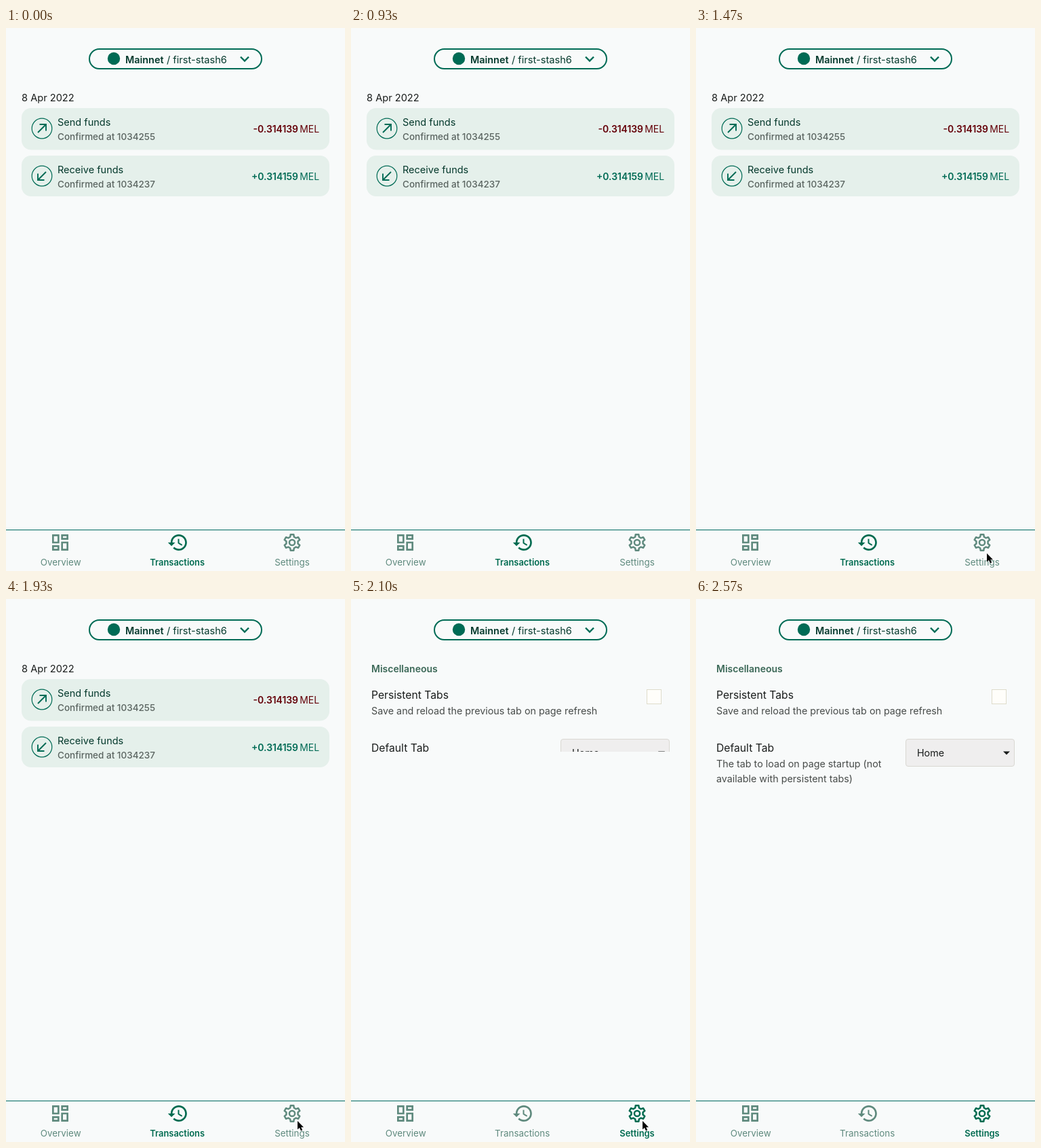
An HTML page that plays this animation: 500 px wide and 800 px high, repeating every 4.01 s.

```html
<!DOCTYPE html>
<html lang="en">
<head>
<meta charset="utf-8">
<title>Wallet tabs</title>
<style>
  html, body { margin: 0; width: 100%; height: 100%; overflow: hidden; background: #f8fafa; }
  svg { display: block; width: 500px; height: 800px; }
  text { font-family: Inter, "Open Sans", sans-serif; font-size: 14.3px; fill: #191c1b; }
  .semi { font-weight: 600; }
  .title { font-size: 14.5px; fill: #04392c; }
  .note { font-size: 13.5px; font-weight: 500; fill: #5a6460; }
  .amount { font-size: 13.9px; font-weight: 600; text-anchor: end; }
  .unit { font-size: 13.9px; text-anchor: end; }
  .out { fill: #640008; }
  .in { fill: #006b55; }
  .row { font-size: 15.7px; }
  .sub { fill: #474b49; }
  .card { fill: #e5f0eb; }
  .line { fill: none; stroke: #006b55; }
  .tab { color: #5f8a7e; }
  .tab text { font-size: 13.4px; fill: currentColor; text-anchor: middle; }
  .tab .fill { fill: currentColor; }
  .tab .stroke { fill: none; stroke: currentColor; stroke-width: 2.5; stroke-linejoin: round; }
  .tab.on { color: #006b50; }
  .tab.on text { font-size: 12.9px; font-weight: 600; }
</style>
</head>
<body>
<svg viewBox="0 0 500 800">
  <defs>
    <clipPath id="reveal"><rect id="window" x="0" y="87" width="500" height="0"/></clipPath>
  </defs>
  <rect width="500" height="800" fill="#f8fafa"/>

  <g id="header">
    <rect x="123" y="31" width="254" height="29" rx="14.5" class="line" stroke-width="2"/>
    <circle cx="159" cy="45" r="9.2" fill="#006b55"/>
    <text x="176" y="52" class="semi" style="font-size:14.4px;fill:#04392c">Mainnet</text>
    <text x="237" y="52" style="font-size:14.6px;fill:#04392c">/ first-stash6</text>
    <path d="M346 42.5l6 6l6-6" class="line" stroke-width="2.4"/>
  </g>

  <g id="history">
    <text x="23" y="108" style="font-size:14.6px">8 Apr 2022</text>
    <g>
      <rect x="23" y="118" width="454" height="61.5" rx="14" class="card"/>
      <circle cx="53" cy="148" r="14.8" class="line" stroke-width="1.2"/>
      <path d="M47 154L59 142M49.5 142H59V151.5" class="line" stroke-width="1.9"/>
      <text x="76" y="144" class="title">Send funds</text>
      <text x="76" y="165" class="note">Confirmed at 1034255</text>
      <text x="431" y="154" class="amount out">-0.314139</text>
      <text x="462" y="154" class="unit out">MEL</text>
    </g>
    <g>
      <rect x="23" y="188" width="454" height="60" rx="14" class="card"/>
      <circle cx="53" cy="218" r="14.8" class="line" stroke-width="1.2"/>
      <path d="M59 212L47 224M56.5 224H47V214.5" class="line" stroke-width="1.9"/>
      <text x="76" y="214" class="title">Receive funds</text>
      <text x="76" y="235" class="note">Confirmed at 1034237</text>
      <text x="431" y="224" class="amount in">+0.314159</text>
      <text x="462" y="224" class="unit in">MEL</text>
    </g>
  </g>

  <g id="settings" clip-path="url(#reveal)">
    <text x="30" y="108" class="semi" style="font-size:14px;fill:#3b6857">Miscellaneous</text>
    <text x="30" y="147" class="row">Persistent Tabs</text>
    <text x="30" y="170" class="sub">Save and reload the previous tab on page refresh</text>
    <rect x="436.5" y="133.5" width="21" height="21" fill="#fffefa" stroke="#dedccb"/>
    <text x="30" y="225" class="row">Default Tab</text>
    <text x="30" y="248" class="sub">The tab to load on page startup (not</text>
    <text x="30" y="270" class="sub">available with persistent tabs)</text>
    <rect x="309.5" y="206.5" width="160" height="40" rx="3.5" fill="#efeeee" stroke="#d9d8d2"/>
    <text x="326" y="232">Home</text>
    <path d="M453 224.5h10l-5 5z" fill="#191c1b"/>
  </g>

  <g id="nav">
    <rect y="739" width="500" height="1" fill="#006a60"/>
    <g class="tab">
      <path class="fill" transform="translate(64 742) scale(1.3333)" d="M19 5v2h-4V5h4M9 5v6H5V5h4m10 8v6h-4v-6h4M9 17v2H5v-2h4M21 3h-8v6h8V3zM11 3H3v10h8V3zm10 8h-8v10h8V11zm-10 4H3v6h8v-6z"/>
      <text x="80.7" y="792">Overview</text>
    </g>
    <g class="tab" id="historyTab">
      <path class="fill" transform="translate(237.5 742) scale(1.3333)" d="M13 3c-4.97 0-9 4.03-9 9H1l3.89 3.89.07.14L9 12H6c0-3.87 3.13-7 7-7s7 3.13 7 7-3.13 7-7 7c-1.93 0-3.68-.79-4.94-2.06l-1.42 1.42C8.27 19.99 10.51 21 13 21c4.97 0 9-4.03 9-9s-4.03-9-9-9zm-1 5v5l4.28 2.54.72-1.21-3.5-2.08V8H12z"/>
      <text x="252.7" y="792">Transactions</text>
    </g>
    <g class="tab" id="settingsTab">
      <g transform="translate(422 758)">
        <path id="gear" class="stroke"/>
        <circle r="4.1" class="stroke"/>
      </g>
      <text x="422" y="792">Settings</text>
    </g>
  </g>

  <path id="cursor" d="M0 0V12.6L2.9 10L5 14.6L7.2 13.6L5.2 9.2H9Z" fill="#000" stroke="#fff" stroke-width=".6" paint-order="stroke"/>
</svg>
<script>
  const LOOP = 4010;
  const SWITCH = 1970, SLIDE = 400, HEIGHT = 198;
  const HIDE = 2565;
  // time, x, y of the pointer tip
  const PATH = [
    [1095, 378, 798], [1170, 395, 768], [1330, 422, 773], [1500, 430, 774], [1870, 430, 769],
    [2200, 430, 769], [2370, 446, 716], [2440, 446, 716], [2535, 482, 669]
  ];
  const get = id => document.getElementById(id);
  const [list, panel, windowRect, listTab, panelTab, cursor] =
    ["history", "settings", "window", "historyTab", "settingsTab", "cursor"].map(get);

  function gearPath() {
    const points = [];
    const add = (r, deg) => {
      const a = deg * Math.PI / 180;
      points.push((r * Math.cos(a)).toFixed(2) + " " + (r * Math.sin(a)).toFixed(2));
    };
    for (let a = -90; a < 270; a += 60) {
      add(8.7, a - 19);
      add(11.9, a - 11);
      add(11.9, a + 11);
      add(8.7, a + 19);
    }
    return "M" + points.join("L") + "Z";
  }

  function pointAt(t) {
    const i = PATH.findIndex(p => p[0] > t);
    if (i < 0) return PATH[PATH.length - 1].slice(1);
    const [t0, x0, y0] = PATH[i - 1], [t1, x1, y1] = PATH[i];
    const k = (t - t0) / (t1 - t0);
    return [x0 + (x1 - x0) * k, y0 + (y1 - y0) * k].map(Math.round);
  }

  const show = (el, on) => el.setAttribute("visibility", on ? "visible" : "hidden");
  const cubicOut = p => 1 - (1 - p) ** 3;

  function render(t) {
    const open = t >= SWITCH;
    show(list, !open);
    show(panel, open);
    listTab.classList.toggle("on", !open);
    panelTab.classList.toggle("on", open);
    const p = Math.min(1, Math.max(0, (t - SWITCH) / SLIDE));
    windowRect.setAttribute("height", Math.round(HEIGHT * cubicOut(p)));

    const moving = t >= PATH[0][0] && t < HIDE;
    show(cursor, moving);
    if (moving) cursor.setAttribute("transform", `translate(${pointAt(t)})`);
  }

  get("gear").setAttribute("d", gearPath());
  const start = performance.now();
  function tick() {
    render((performance.now() - start) % LOOP);
    requestAnimationFrame(tick);
  }
  tick();
</script>
</body>
</html>
```
